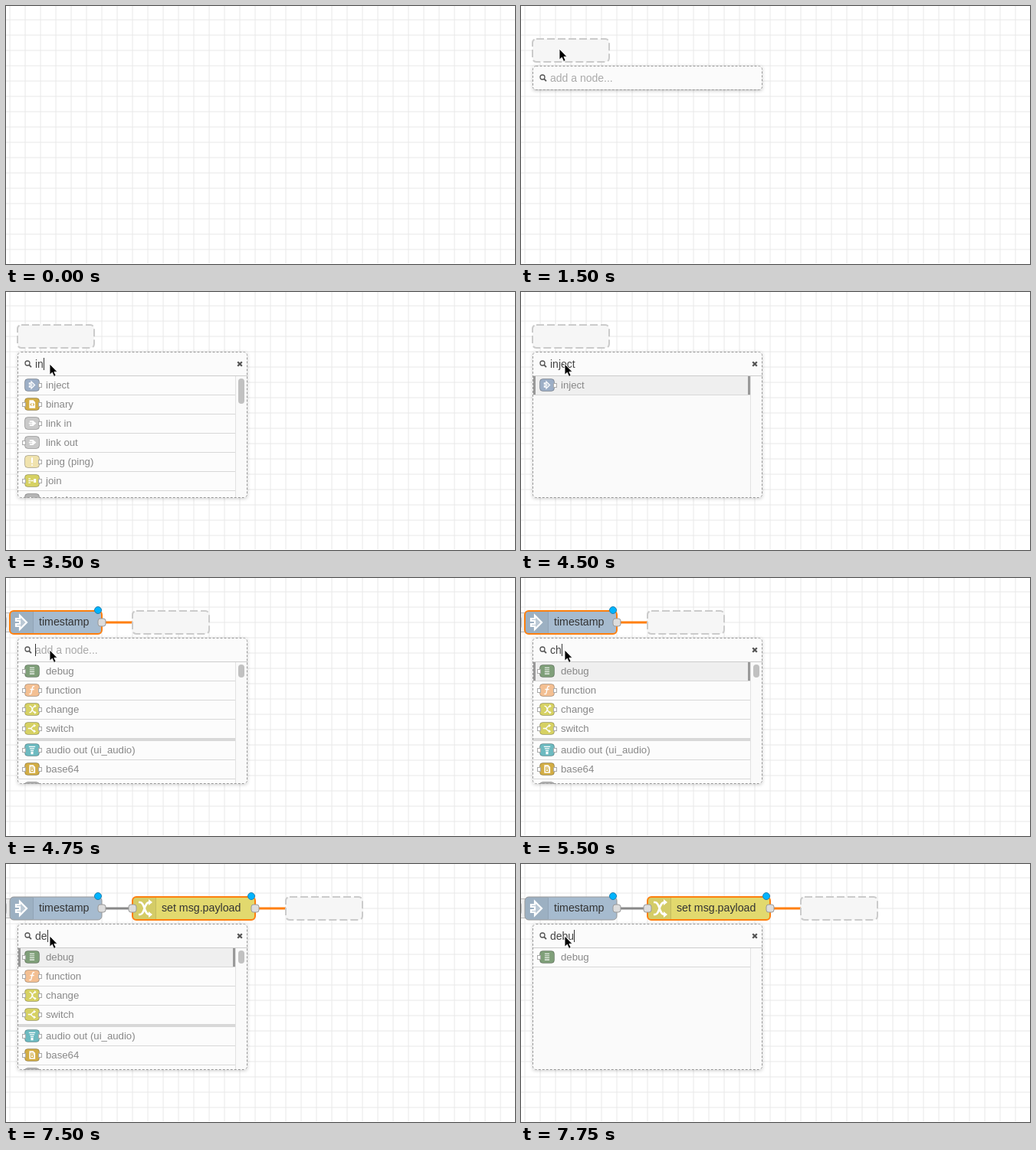
Recreate the animation shown at these times as an HTML page. Size 664 by 337 pixels, loop 8 s.

```html
<!DOCTYPE html>
<html lang="en">
<head>
<meta charset="utf-8">
<title>Quick-add nodes</title>
<style>
  html, body { margin: 0; width: 100%; height: 100%; overflow: hidden; background: #fff; }
  svg { display: block; width: 664px; height: 337px; }
  text { font: 14px "Liberation Sans", Arial, sans-serif; fill: #444; white-space: pre; }
  .label { font-size: 14.2px; fill: #333; }
  .hint { fill: #aaa; }
  .row { font-size: 13.2px; fill: #888; }
  .ghost { fill: #f6f6f6; stroke: #cbcbcb; stroke-width: 2; stroke-dasharray: 10 4; }
  .port { fill: #ddd; stroke: #999; }
  .glyph { fill: none; stroke: #fff; stroke-width: 2.6; }
  .glyph .solid { fill: #fff; stroke: none; }
  .frame { fill: #fafafa; filter: drop-shadow(0 1px 2px rgba(0, 0, 0, .2)); }
  .edge { fill: none; stroke: #999; stroke-dasharray: 3 2; }
  .tool { fill: none; stroke: #555; }
</style>
</head>
<body>
<svg viewBox="0 0 664 337">
  <defs>
    <pattern id="grid" x="-5" y="8" width="20" height="20" patternUnits="userSpaceOnUse">
      <path d="M10 0V20M0 10H20" stroke="#e8e8e8"/>
    </pattern>
    <clipPath id="clip"><rect id="clipBox" x="15" y="78" width="300" height="191" rx="4"/></clipPath>
  </defs>
  <rect width="664" height="336" fill="url(#grid)"/>
  <g id="flow"></g>
  <g id="dialog"></g>
  <path id="cursor" d="M0 0V14.2L3.3 11.2 5.6 16.4 8.2 15.3 5.9 10.3H10Z" stroke="#fff" stroke-width=".9"/>
</svg>
<script>
const LOOP = 8000;
const $ = id => document.getElementById(id);

// Glyphs are centred on 0,0 and fit a 30 px node icon.
const glyphs = {
  inject: '<path d="M-7-5H-2V-9L7 0-2 9V5H-7V2H-2V-2H-7Z" fill="#fff" fill-opacity=".3" stroke-width="2.2"/>',
  debug: '<path d="M-6-8H6M-6-3H6M-6 2H6M-6 7H6" stroke-width="2"/>',
  func: '<path d="M6-9C1-11 1-7 0-2L-2 7C-3 11-5 10-7 9M-5-2H5"/>',
  change: '<path d="M-7-8H-5C1-8 0 8 7 8M-7 8H-5C1 8 0-8 7-8"/><path class="solid" d="M6-12 11-8 6-4ZM6 4 11 8 6 12Z"/>',
  fork: '<path d="M-10 0H-5C1 0 0-7 5-7M-5 0C1 0 0 7 5 7"/><path class="solid" d="M4-11 10-7 4-3ZM4 3 10 7 4 11Z"/>',
  audio: '<path d="M-8-8H8M-6-3H6M-4 2H4"/><path class="solid" d="M-3 5H3V11H-3Z"/>',
  page: '<path class="solid" d="M-7-10H3L8-5V10H-7Z"/><path d="M-3-5H2V0H-3ZM-3 0H3V6H-3Z" stroke="#d2ad45" stroke-width="2"/>',
  code: '<path class="solid" d="M-7-10H3L8-5V10H-7Z"/><path d="M-1-2-4 1-1 4M2-2 5 1 2 4" stroke="#d2ad45" stroke-width="2"/>',
  link: '<path d="M-6-5H2V5H-6M-8 0H7M3-4 8 0 3 4" stroke-width="3"/>',
  alert: '<path d="M0-10V4M0 7V10" stroke-width="4"/>',
  join: '<path d="M-9-5H-4M-9 0H-4M-9 5H-4M-3 0H3"/><path class="solid" d="M4-5H10V5H4Z"/>'
};

// name: [fill, glyph, has input, has output]
const types = {
  'inject': ['#9caec6', 'inject', 0, 1],
  'debug': ['#7f9f79', 'debug', 1, 0],
  'function': ['#f3bf92', 'func', 1, 1],
  'change': ['#d6d163', 'change', 1, 1],
  'switch': ['#d6d163', 'fork', 1, 1],
  'audio out (ui_audio)': ['#6dbac0', 'audio', 1, 1],
  'base64': ['#d2ad45', 'page', 1, 1],
  'binary': ['#d2ad45', 'code', 1, 1],
  'link in': ['#c9c9c9', 'link', 0, 1],
  'link out': ['#c9c9c9', 'link', 1, 0],
  'ping (ping)': ['#f0e3ae', 'alert', 0, 1],
  'join': ['#d6d163', 'join', 1, 1],
  'udp in': ['#b5b5b5', 'link', 0, 1],
  'batch': ['#b5b5b5', 'link', 1, 1]
};

const common = ['debug', 'function', 'change', 'switch'];
const lists = {
  all: { rows: ['inject', ...common, 'audio out (ui_audio)', 'base64'], rule: 5, thumb: 17 },
  next: { rows: [...common, 'audio out (ui_audio)', 'base64', 'batch'], rule: 4, thumb: 17 },
  in: { rows: ['inject', 'binary', 'link in', 'link out', 'ping (ping)', 'join', 'udp in'], thumb: 33 },
  inject: { rows: ['inject'] },
  change: { rows: ['change'] },
  debug: { rows: ['debug'] }
};

// Each step changes only what it names; the rest carries over.
const steps = [
  { t: 0, stage: 0, h: 0, text: '', caret: 0, pick: 1, list: 'all', at: null },
  { t: 500, at: [111, 98] },
  { t: 750, at: [68, 68] },
  { t: 1000, at: [53, 67] },
  { t: 1250, at: [50, 56] },
  { t: 1500, stage: 1, h: 32 },
  { t: 1750, h: 189 },
  { t: 2000, h: 191, at: [53, 71] },
  { t: 2250, at: [53, 93] },
  { t: 2500, at: [57, 94], caret: 1 },
  { t: 3000, caret: 0 },
  { t: 3500, text: 'in', caret: 1, list: 'in', pick: 0 },
  { t: 3750, text: 'injec', list: 'inject', pick: 1 },
  { t: 4000, text: 'inject' },
  { t: 4500, caret: 0 },
  { t: 4750, stage: 2, text: '', caret: 1, list: 'next', pick: 0 },
  { t: 5000, pick: 1 },
  { t: 5250, caret: 0 },
  { t: 5500, text: 'ch', caret: 1 },
  { t: 5750, text: 'chan', list: 'change' },
  { t: 6000, text: 'change' },
  { t: 6500, stage: 3, text: '', list: 'next' },
  { t: 7000, caret: 0 },
  { t: 7500, text: 'de', caret: 1 },
  { t: 7750, text: 'debu', list: 'debug', pick: 0 }
];
for (let i = 1; i < steps.length; i++) steps[i] = { ...steps[i - 1], ...steps[i] };

const rect = (x, y, w, h, attrs = '') => `<rect x="${x}" y="${y}" width="${w}" height="${h}" ${attrs}/>`;
const text = (x, y, s, cls = '') => `<text x="${x}" y="${y}" class="${cls}">${s}</text>`;
const glyph = (name, x, y, scale = 1) =>
  `<g class="glyph" transform="translate(${x} ${y}) scale(${scale})">${glyphs[name]}</g>`;
const port = x => rect(x - 5, 53, 10, 10, 'rx="3" class="port"');
const ghost = x => rect(x, 43, 100, 30, 'rx="5" class="ghost"');
const wire = (x, active) => `<path d="M${x} 58h40" stroke="${active ? '#ff7f0e' : '#888'}" stroke-width="3"/>`;

function node(x, w, fill, icon, label, active) {
  const line = active ? 'stroke="#ff7f0e" stroke-width="2"' : 'stroke="#999"';
  return rect(x, 43, w, 30, `rx="5" fill="${fill}"`) +
    `<path d="M${x + 5} 43H${x + 30}V73H${x + 5}Q${x} 73 ${x} 68V48Q${x} 43 ${x + 5} 43" fill="#000" opacity=".06"/>` +
    `<path d="M${x + 30.5} 44V72" stroke="#000" opacity=".12"/>` +
    glyph(icon, x + 15, 58) + rect(x, 43, w, 30, `rx="5" fill="none" ${line}`) +
    text(x + 38, 62, label, 'label') + port(x + w) +
    `<circle cx="${x + w - 5}" cy="42" r="4.5" fill="#00b4ff" stroke="#1f7fb0"/>`;
}

function flow(stage) {
  if (!stage) return '';
  if (stage === 1) return ghost(15);
  const later = stage === 3;
  let out = wire(125, !later) +
    rect(-20, 45.5, 32, 25, 'rx="5" fill="#eee" stroke="#bbb"') +
    rect(-15.5, 49.5, 16, 17, 'rx="4" fill="#a6bbcf" stroke="#bbb"') +
    node(5, 120, '#a6bbcf', 'inject', 'timestamp', !later);
  if (later) out += wire(325, true) + node(165, 160, '#e2d96e', 'change', 'set msg.payload', true) + port(165);
  return out + ghost(later ? 365 : 165);
}

function row(name, y, picked) {
  const [fill, icon, input, output] = types[name];
  const tab = x => rect(x, y + 9.5, 4, 5, 'fill="#fff" stroke="#aaa"');
  return rect(16, y, 283, 24, `fill="${picked ? '#efefef' : '#fcfcfc'}"`) +
    (picked ? rect(16, y, 3, 24, 'fill="#999"') + rect(296, y, 3, 24, 'fill="#999"') : '') +
    rect(16, y + 24, 283, 1, 'fill="#d8d8d8"') +
    rect(24.5, y + 3.5, 19, 16, `rx="4" fill="${fill}" stroke="#000" stroke-opacity=".25"`) +
    glyph(icon, 34, y + 11.5, .52) +
    (input ? tab(21.5) : '') + (output ? tab(42.5) : '') +
    text(52, y + 16, name, 'row');
}

function listing(s) {
  const { rows, rule, thumb } = lists[s.list];
  let y = 110, out = '';
  rows.forEach((name, i) => {
    if (i === rule) {
      out += rect(16, y - 1, 283, 4, 'fill="#d8d8d8"');
      y += 3;
    }
    out += row(name, y, s.pick && i === 0);
    y += 25;
  });
  out += rect(299, 110, 1, 159, 'fill="#e2e2e2"');
  if (thumb) out += rect(303, 113, 8, thumb, 'rx="4" fill="#c1c1c1"');
  return out;
}

const pen = document.createElement('canvas').getContext('2d');
pen.font = '14px "Liberation Sans", Arial, sans-serif';

function dialog(s) {
  if (!s.h) return '';
  const caretX = 38 + Math.round(pen.measureText(s.text).width);
  return rect(15, 78, 300, s.h, 'rx="4" class="frame"') +
    '<g clip-path="url(#clip)">' +
    rect(15, 78, 300, 31, 'fill="#fbfbfb"') + rect(15, 109, 300, 1, 'fill="#ccc"') +
    '<circle cx="28" cy="93" r="3" class="tool" stroke-width="1.3"/><path d="M30 95.2 33 98.2" class="tool" stroke-width="1.8"/>' +
    text(38, 99, s.text || 'add a node...', s.text ? '' : 'hint') +
    (s.text ? '<path d="M302.2 91.2 307.8 96.8M307.8 91.2 302.2 96.8" class="tool" stroke-width="2.3"/>' : '') +
    (s.caret ? rect(caretX, 86, 1, 16, 'fill="#333"') : '') +
    listing(s) + '</g>' +
    rect(15.5, 78.5, 299, s.h - 1, 'rx="4" class="edge"');
}

function draw(s) {
  $('clipBox').setAttribute('height', s.h);
  $('flow').innerHTML = flow(s.stage);
  $('dialog').innerHTML = dialog(s);
  $('cursor').setAttribute('visibility', s.at ? 'visible' : 'hidden');
  if (s.at) $('cursor').setAttribute('transform', `translate(${s.at})`);
}

let start, shown;
function tick(now) {
  start ??= now;
  const t = (now - start) % LOOP;
  const step = steps.findLast(s => s.t <= t) || steps[0];
  if (step !== shown) draw(shown = step);
  requestAnimationFrame(tick);
}
draw(shown = steps[0]);
requestAnimationFrame(tick);
</script>
</body>
</html>
```
